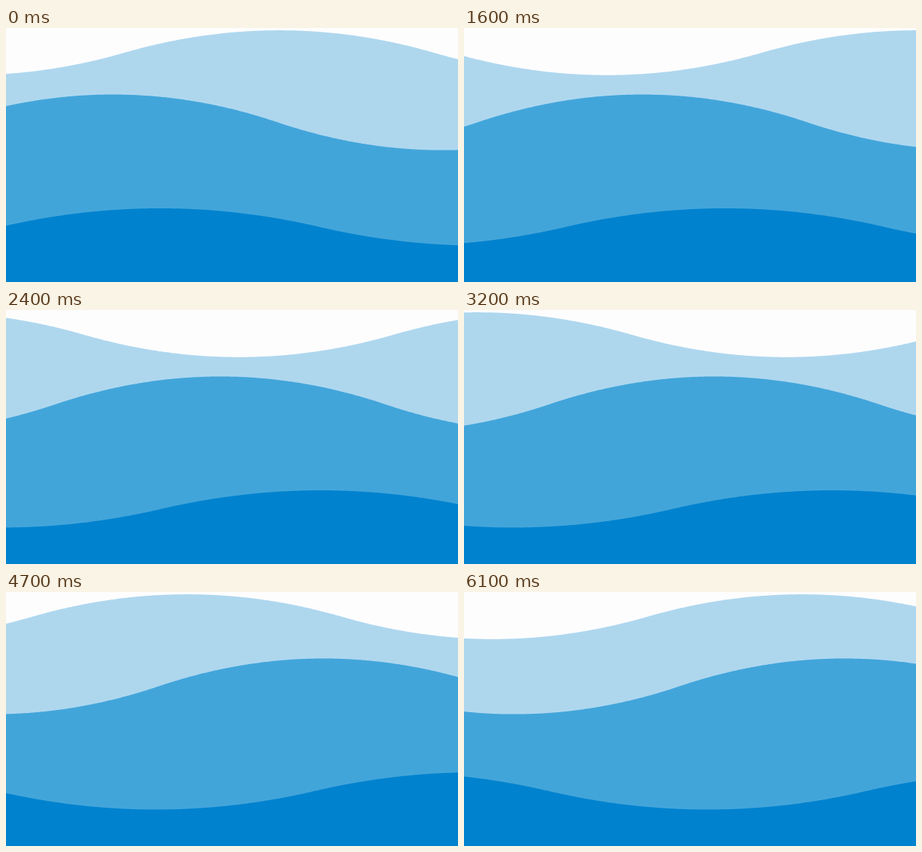
Write an HTML page with a canvas that moves like this. It is 600 px wide and 338 px high and loops after 6200 ms.

```html
<!DOCTYPE html>
<html lang="en">
<head>
<meta charset="utf-8">
<title>Waves</title>
<style>
  html, body { margin: 0; height: 100%; overflow: hidden; background: #fefdfe; }
  canvas { display: block; width: 600px; height: 338px; }
</style>
</head>
<body>
<canvas id="stage" width="600" height="338"></canvas>
<script>
const WIDTH = 600, HEIGHT = 338, LOOP = 6200, STEP = 100;
const ctx = document.getElementById('stage').getContext('2d');

// crest: x of a crest at time 0; speed in px per ms
const waves = [
  { color: '#aed7ee', top: 3.1,  bottom: 62.7,  length: 822, crest: 362.5, speed: 0.1489 },
  { color: '#42a5da', top: 88.5, bottom: 162.6, length: 876, crest: 141.7, speed: 0.0595 },
  { color: '#0082ce', top: 240,  bottom: 289.5, length: 846, crest: 204.5, speed: 0.0888 }
];

// Alternating parabolic arcs, joined smoothly at mid height
function waveY(wave, x, crest) {
  const half = wave.length / 2;
  const n = Math.round((x - crest) / half);
  const u = (x - crest - n * half) / (half / 2);
  const amp = (wave.bottom - wave.top) / 2;
  return n % 2 === 0 ? wave.top + amp * u * u : wave.bottom - amp * u * u;
}

function drawWave(wave, time) {
  const crest = wave.crest + wave.speed * time;
  ctx.fillStyle = wave.color;
  ctx.beginPath();
  ctx.moveTo(0, HEIGHT);
  for (let x = 0; x <= WIDTH; x += 2) ctx.lineTo(x, waveY(wave, x, crest));
  ctx.lineTo(WIDTH, HEIGHT);
  ctx.fill();
}

function render() {
  const time = Math.floor((performance.now() - start) % LOOP / STEP) * STEP;
  ctx.fillStyle = '#fefdfe';
  ctx.fillRect(0, 0, WIDTH, HEIGHT);
  for (const wave of waves) drawWave(wave, time);
  requestAnimationFrame(render);
}

const start = performance.now();
render();
</script>
</body>
</html>
```
